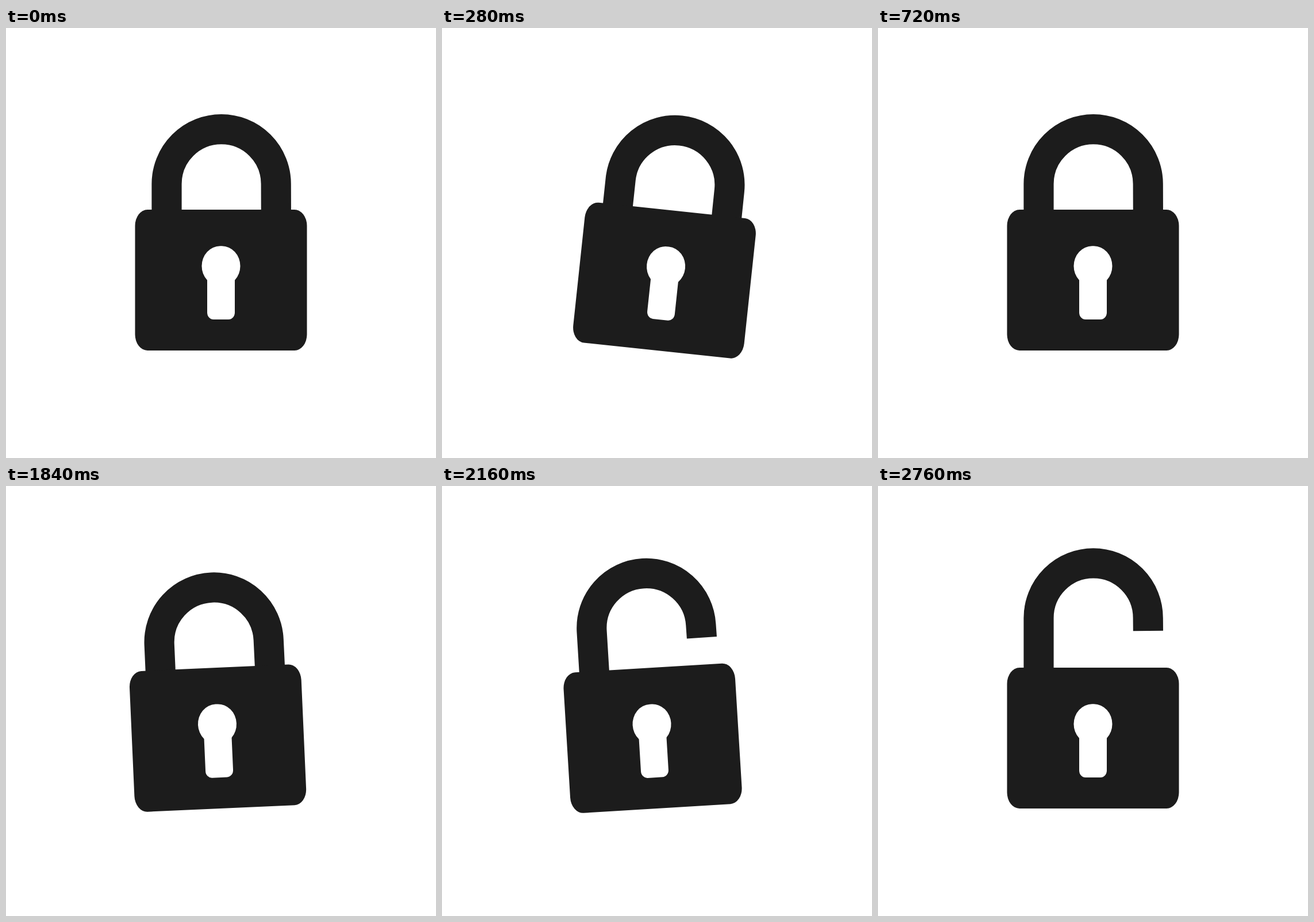
These frames come from a looping animation (748 by 748 pixels, 7240 ms). An HTML page:

```html
<!DOCTYPE html>
<html lang="en">
<head>
<meta charset="utf-8">
<title>Padlock</title>
<style>
  html, body { margin: 0; width: 100%; height: 100%; overflow: hidden; background: #fff; }
  svg { display: block; width: 100%; height: 100%; }
</style>
</head>
<body>
<svg viewBox="0 0 748 748">
  <g id="lock" fill="#1c1c1c">
    <path id="shackle" fill="none" stroke="#1c1c1c" stroke-width="52.2"/>
    <rect x="224.5" y="316" width="299" height="245" rx="21.5" ry="28"/>
    <g fill="#fff">
      <rect x="340.5" y="379.3" width="67" height="69.4" rx="32" ry="34.7"/>
      <rect x="350" y="420" width="48" height="87" rx="11" ry="12"/>
    </g>
  </g>
</svg>
<script>
const LOOP = 7240, STEP = 40;
const lock = document.getElementById('lock');
const shackle = document.getElementById('shackle');

// [time, angle] keys, eased in and out between neighbours
const SWING = [
  [0, 0], [120, -10.4], [320, 8], [520, -5], [720, 0],
  [1800, 0], [1907, -8.1], [2014, 8.1], [2121, -5], [2228, 0]
];

const progress = (t, from, to) => Math.min(1, Math.max(0, (t - from) / (to - from)));
const smooth = u => u * u * (3 - 2 * u);

function angleAt(t) {
  const i = SWING.findIndex(key => key[0] > t);
  if (i < 1) return 0;
  const [t0, a0] = SWING[i - 1], [t1, a1] = SWING[i];
  return a0 + (a1 - a0) * smooth(progress(t, t0, t1));
}

// cubic-bezier(1/3, 0, 0, 1), solved by bisection
function longTail(u) {
  let lo = 0, hi = 1;
  for (let i = 0; i < 24; i++) {
    const s = (lo + hi) / 2;
    if (s * (1 - s) ** 2 + s ** 3 < u) lo = s; else hi = s;
  }
  return u >= 1 ? 1 : smooth(lo);
}

function draw(t) {
  const lift = 41.8 * longTail(progress(t, 1920, 2760));
  const leg = 60 - 37.5 * smooth(progress(t, 1920, 2160));
  const y = 271.3 - lift;
  lock.setAttribute('transform', `rotate(${angleAt(t)} 374 561)`);
  shackle.setAttribute('d',
    `M279.5 335V${y}A95.1 95.1 0 0 1 469.7 ${y}L469.9 ${y + leg}`);
}

const start = performance.now();
function tick() {
  const t = (performance.now() - start) % LOOP;
  draw(Math.floor(t / STEP) * STEP);
  requestAnimationFrame(tick);
}
tick();
</script>
</body>
</html>
```
